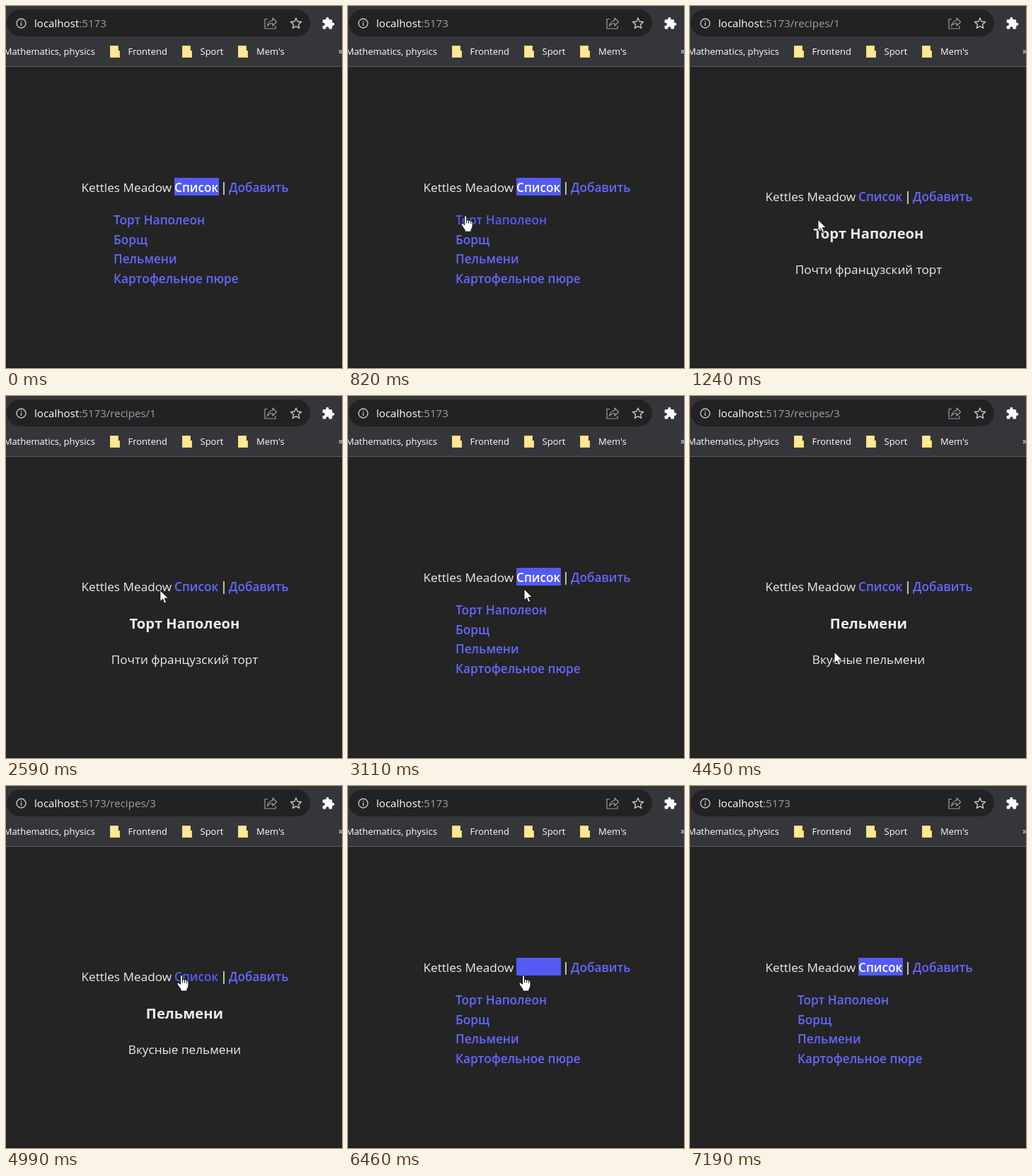
Recreate the animation shown at these times as an HTML page. Size 475 px wide and 512 px high, loop 8000 ms.

```html
<!DOCTYPE html>
<html lang="ru">
<head>
<meta charset="utf-8">
<title>Recipes</title>
<style>
  html, body { margin: 0; width: 100%; height: 100%; overflow: hidden; background: #242424; }
  svg { display: block; width: 475px; height: 512px; }
  text { font-family: "Open Sans", "Noto Sans", sans-serif; white-space: pre; }
  .bar { font-size: 13px; fill: #fff; }
  .url { font-size: 15.1px; fill: #fff; }
  .path { fill: #9aa0a6; }
  .page { font-size: 17.2px; fill: #ececec; }
  .link { font-weight: 600; fill: #6467ff; }
  .active { fill: #fff; }
  .hover { fill: #535bf2; }
  .mid { text-anchor: middle; }
  #title { font-size: 20.2px; font-weight: 700; }
  #cursor path { fill: #fff; stroke: #000; stroke-width: .9; stroke-linejoin: round; }
  .icon { fill: none; stroke: #c4c7cb; stroke-width: 1.4; stroke-linejoin: round; }
</style>
</head>
<body>
<svg viewBox="0 0 475 512">
  <defs>
    <g id="folder">
      <path d="M0 56h12v7h2v10H0z" fill="#f5d668"/>
      <path d="M1 57h10v7h2v8H1z" fill="#ffe79a"/>
    </g>
  </defs>

  <rect width="475" height="512" fill="#242424"/>
  <rect width="475" height="85" fill="#35363a"/>
  <rect y="85" width="475" height="1" fill="#5b5c60"/>
  <rect y="510" width="475" height="2" fill="#1d1d1d"/>
  <rect x="1" y="5" width="429" height="38" rx="19" fill="#222223"/>

  <circle class="icon" cx="21.5" cy="24.5" r="6.5"/>
  <path class="icon" d="M21.5 23.5v4.5M21.5 20.8v1.5"/>
  <path class="icon" style="stroke:#9aa0a6;stroke-width:1.2" d="M370 18.5h-4V32h15v-4M369.5 28.5Q371 21 377 20.5V17l5.5 5.5L377 28v-3.5q-5 0-7.5 4z"/>
  <path class="icon" d="M410 17l2.2 5 5.4.5-4.1 3.6 1.2 5.3-4.7-2.8-4.7 2.8 1.2-5.3-4.1-3.6 5.4-.5z"/>
  <path fill="#fff" transform="translate(446 15) scale(.8)" d="M20.5 11H19V7c0-1.1-.9-2-2-2h-4V3.5a2.5 2.5 0 0 0-5 0V5H4c-1.1 0-2 .9-2 2v3.8h1.5a2.7 2.7 0 0 1 0 5.4H2V20c0 1.1.9 2 2 2h3.8v-1.5a2.7 2.7 0 0 1 5.4 0V22H17c1.1 0 2-.9 2-2v-4h1.5a2.5 2.5 0 0 0 0-5z"/>

  <text class="url" x="40" y="30">localhost<tspan class="path">:5173<tspan id="route"></tspan></tspan></text>
  <g class="bar">
    <text x="126" y="69" text-anchor="end">Mathematics, physics</text>
    <use href="#folder" x="147"/><text x="172.5" y="69">Frontend</text>
    <use href="#folder" x="249"/><text x="274.5" y="69">Sport</text>
    <use href="#folder" x="328"/><text x="354" y="69">Mem's</text>
    <text x="470" y="68">»</text>
  </g>

  <g class="page">
    <g id="nav">
      <rect id="mark" x="238" y="243" width="63" height="25" fill="#535bf2"/>
      <text x="106.5" y="263">Kettles Meadow</text>
      <text class="link" id="home" x="238" y="263">Список</text>
      <text class="mid" font-weight="600" x="308" y="263">|</text>
      <text class="link" x="315" y="263">Добавить</text>
    </g>
    <g id="list"></g>
    <g id="recipe">
      <text class="mid" id="title" x="252.5" y="329"></text>
      <text class="mid" id="about" x="252.5" y="379"></text>
    </g>
  </g>

  <g id="cursor">
    <path id="arrow" d="M0 0V16L3.7 12.6 6 18.5 8.8 17.3 6.4 11.6H11.5Z"/>
    <g id="hand">
      <path d="M-1.5 1.5Q0-.5 1.5 1.5V7Q3.5 5.8 4.5 7.5 6.5 6.4 7.5 8.2 10 7.4 10 10V15Q10 18 8 20V23H-1V20.5Q-3 18-6 13-6.5 10.5-4 11L-1.5 13.5Z"/>
      <path d="M1.5 7v4M4.5 7.5v4M7.5 8.5v3.5"/>
    </g>
  </g>
</svg>
<script>
const LOOP = 8000, TICK = 130;
const $ = id => document.getElementById(id);
const show = (id, on) => $(id).style.display = on ? '' : 'none';

const titles = ['Торт Наполеон', 'Борщ', 'Пельмени', 'Картофельное пюре'];
const about = { 1: 'Почти французский торт', 3: 'Вкусные пельмени' };
$('list').innerHTML = titles.map((title, i) =>
  `<text class="link" x="152" y="${Math.round(309 + 27.6 * i)}">${title}</text>`).join('');
const links = [...document.querySelectorAll('.link')];

// Visits to a recipe: from, to, number; the list shows otherwise
const visits = [[1240, 3110, 1], [4450, 6460, 3]];

const easeOut = u => 1 - (1 - u) ** 3;
const easeIn = u => u ** 3;

// Pointer glides: start, duration, end point; zero duration is a jump
const glides = [
  [430, 0, 62, 255], [430, 540, 181, 302, easeOut],
  [1400, 360, -417, 285, easeIn],
  [2320, 0, 0, 286], [2320, 540, 249, 273, easeOut],
  [3140, 480, 212, 389, easeOut], [3620, 430, 204, 362, easeOut],
  [4450, 540, 248, 267, easeOut],
  [6600, 140, 245, 271, easeOut], [6740, 450, -180, 150, easeIn],
];

// The pointer moves in steps of about one TICK
function pointer(t) {
  let x = -40, y = 255;
  for (const [start, duration, endX, endY, ease] of glides) {
    if (t < start) break;
    const steps = Math.round(duration / TICK);
    const u = duration ? Math.min(1, Math.floor((t - start) / duration * steps + 1e-6) / steps) : 1;
    const k = ease ? ease(u) : u;
    x += (endX - x) * k;
    y += (endY - y) * k;
  }
  return [x, y];
}

function inside(link, x, y) {
  const b = link.getBoundingClientRect();
  return x >= b.left && x <= b.right && y >= b.top && y <= b.bottom;
}

function draw() {
  const t = performance.now() % LOOP;
  const visit = visits.find(([from, to]) => t >= from && t < to);
  const page = visit ? visit[2] : 0;
  const [x, y] = pointer(t);

  $('route').textContent = page ? '/recipes/' + page : '';
  $('title').textContent = page ? titles[page - 1] : '';
  $('about').textContent = page ? about[page] : '';
  $('nav').setAttribute('transform', `translate(0 ${page ? 13 : 0})`);
  $('home').classList.toggle('active', !page);
  show('mark', !page);
  show('list', !page);
  show('recipe', page);

  let hovering = false;
  for (const link of links) {
    const shown = !page || $('nav').contains(link);
    const hit = shown && inside(link, x, y);
    link.classList.toggle('hover', hit);
    hovering ||= hit;
  }
  show('hand', hovering);
  show('arrow', !hovering);
  $('cursor').setAttribute('transform', `translate(${x} ${y})`);
  requestAnimationFrame(draw);
}
draw();
</script>
</body>
</html>
```
